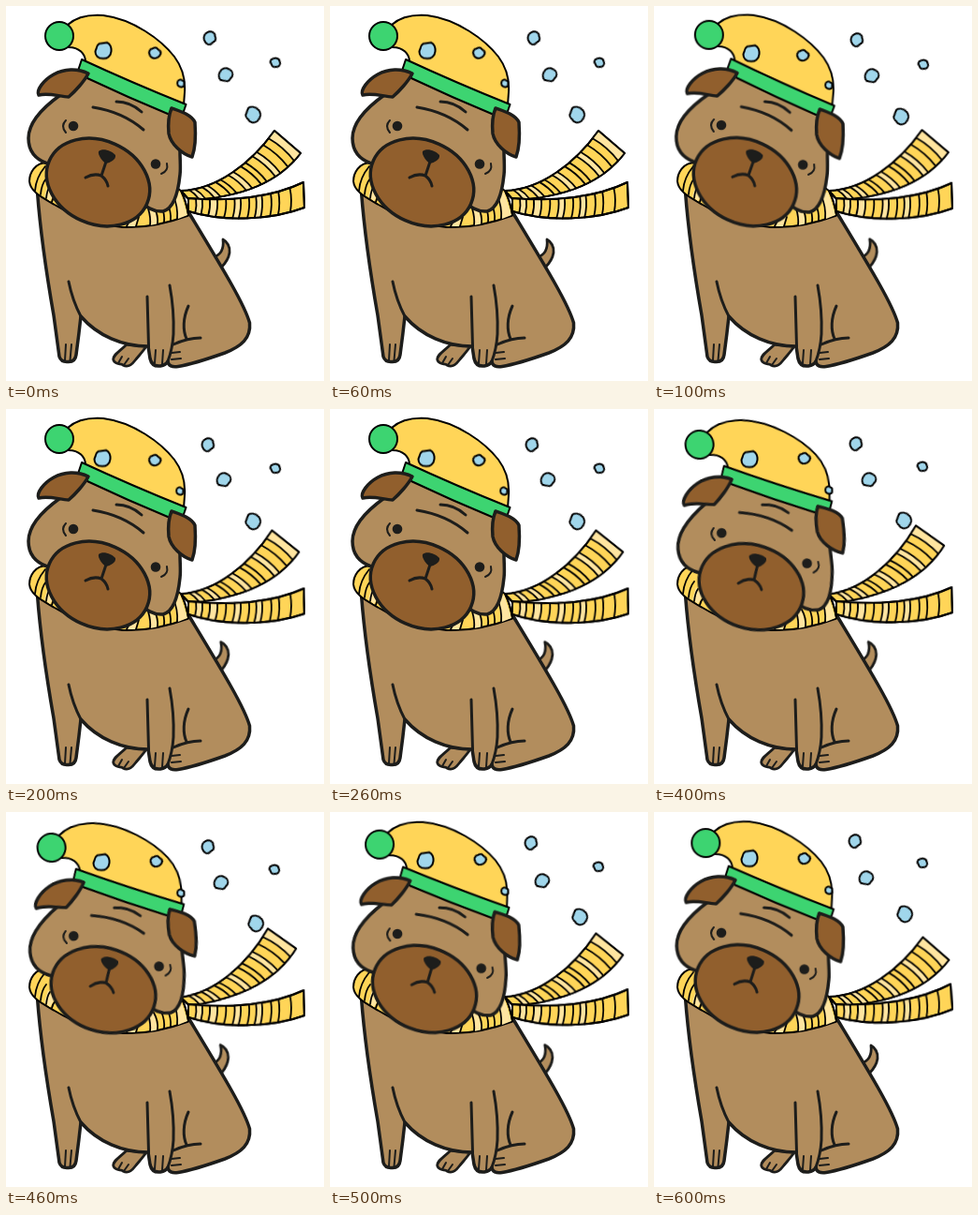
Recreate the animation shown at these times as an HTML page. Size 340x400 px, loop 0.7 s.

```html
<!DOCTYPE html>
<html lang="en">
<head>
<meta charset="utf-8">
<title>Dog in a windy scarf</title>
<style>
html, body { margin: 0; width: 100%; height: 100%; overflow: hidden; background: #fff; }
svg { display: block; width: 340px; height: 400px; }
path, circle, ellipse { stroke-linecap: round; stroke-linejoin: round; }
.fur { fill: #b28d5d; stroke: #1d1d1b; stroke-width: 3.5; }
.dark { fill: #915f2d; stroke: #1d1d1b; stroke-width: 3.5; }
.line { fill: none; stroke: #1d1d1b; stroke-width: 3; }
.thin { fill: none; stroke: #1d1d1b; stroke-width: 2; }
.ink { fill: #1d1d1b; }
.yellow { fill: #ffd558; stroke: #000; stroke-width: 2; }
.pale { fill: #ffe5a0; }
.green { fill: #3dd471; stroke: #000; stroke-width: 2; }
.edge { fill: none; stroke: #000; stroke-width: 1.8; }
.flake { fill: #a0d6eb; stroke: #000; stroke-width: 2; }
.flake path { vector-effect: non-scaling-stroke; }

/* Poses are held for a seventh of the loop each. */
.move { animation: 700ms step-end infinite; }
#head { transform-origin: 119px 127px; animation-name: tilt; }
#upper { transform-origin: 193px 203px; animation-name: flap; }
#lower { transform-origin: 195px 210px; animation-name: wave; }
#tail { transform-origin: 226px 275px; animation-name: wag; }
@keyframes tilt {
  0%, 28.571% { transform: rotate(0deg); }
  14.285% { transform: rotate(1.1deg); }
  42.857%, 71.428% { transform: rotate(-2.4deg); }
  57.142% { transform: rotate(-5.2deg); }
  85.714%, 100% { transform: rotate(-1deg); }
}
@keyframes flap {
  0% { transform: rotate(0deg); }
  14.285% { transform: rotate(-.4deg); }
  28.571%, 71.428% { transform: rotate(-2.1deg); }
  42.857% { transform: rotate(-3.5deg); }
  57.142% { transform: rotate(-5.4deg); }
  85.714%, 100% { transform: rotate(.4deg); }
}
@keyframes wave {
  0% { transform: rotate(0deg); }
  14.285% { transform: rotate(.4deg); }
  28.571% { transform: rotate(1.6deg); }
  42.857% { transform: rotate(2.7deg); }
  57.142% { transform: rotate(1deg); }
  71.428% { transform: rotate(.6deg); }
  85.714%, 100% { transform: rotate(-2.1deg); }
}
@keyframes wag {
  0% { transform: rotate(0deg); }
  14.285% { transform: rotate(-3deg); }
  28.571%, 71.428% { transform: rotate(-5deg); }
  42.857%, 57.142% { transform: rotate(-6deg); }
  85.714%, 100% { transform: rotate(0deg); }
}
@keyframes drift1 {
  0% { transform: translate(104px, 47.5px); }
  14.285% { transform: translate(104px, 50.5px); }
  28.571% { transform: translate(103px, 52.5px); }
  42.857% { transform: translate(104px, 54.5px); }
  57.142% { transform: translate(102px, 53.5px); }
  71.428% { transform: translate(102px, 51.5px); }
  85.714%, 100% { transform: translate(102px, 49.5px); }
}
@keyframes drift2 {
  0% { transform: translate(159px, 50px); }
  14.285% { transform: translate(159px, 52.5px); }
  28.571% { transform: translate(159px, 54.5px); }
  42.857% { transform: translate(159.5px, 55.5px); }
  57.142% { transform: translate(160.5px, 52.5px); }
  71.428% { transform: translate(160.5px, 50.5px); }
  85.714%, 100% { transform: translate(160.5px, 49.5px); }
}
@keyframes drift3 {
  0% { transform: translate(187px, 82.5px); }
  14.285% { transform: translate(187px, 84.5px); }
  28.571% { transform: translate(186px, 87.5px); }
  42.857% { transform: translate(187px, 89.5px); }
  57.142% { transform: translate(187px, 86.5px); }
  71.428% { transform: translate(187px, 84.5px); }
  85.714%, 100% { transform: translate(187px, 83.5px); }
}
@keyframes drift4 {
  0% { transform: translate(218px, 34px); }
  14.285% { transform: translate(217px, 36px); }
  28.571% { transform: translate(216px, 38px); }
  42.857% { transform: translate(216px, 39.5px); }
  57.142% { transform: translate(216px, 37px); }
  71.428% { transform: translate(215px, 33px); }
  85.714%, 100% { transform: translate(215px, 31px); }
}
@keyframes drift5 {
  0% { transform: translate(235px, 73.5px); }
  14.285% { transform: translate(233px, 74.5px); }
  28.571% { transform: translate(233px, 75.5px); }
  42.857% { transform: translate(232px, 78px); }
  57.142% { transform: translate(230px, 75.5px); }
  71.428% { transform: translate(227px, 73.5px); }
  85.714%, 100% { transform: translate(227px, 70.5px); }
}
@keyframes drift6 {
  0% { transform: translate(288px, 60.5px); }
  14.285% { transform: translate(288px, 62.5px); }
  28.571% { transform: translate(288px, 63.5px); }
  42.857% { transform: translate(287px, 65.5px); }
  57.142% { transform: translate(287px, 61.5px); }
  71.428% { transform: translate(287px, 58.5px); }
  85.714%, 100% { transform: translate(287px, 54.5px); }
}
@keyframes drift7 {
  0% { transform: translate(264px, 116px); }
  14.285% { transform: translate(264px, 118px); }
  28.571% { transform: translate(264px, 120px); }
  42.857% { transform: translate(264px, 121.5px); }
  57.142% { transform: translate(267px, 119px); }
  71.428% { transform: translate(267px, 112px); }
  85.714%, 100% { transform: translate(268px, 109px); }
}
</style>
</head>
<body>
<svg viewBox="0 0 340 400">
  <clipPath id="crop"><rect width="320" height="400"/></clipPath>

  <g id="body">
    <path id="tail" class="fur move" style="stroke-width:2.8" d="M232,249C236,251 240,257 239,263C238,270 234,275 230,279L222,268C231,265 233,258 232,249Z"/>
    <path class="fur" style="stroke-width:2.8" d="M129,361C121,369 113,373 115,378C117,383 123,381 125,383C130,386 135,382 138,378C142,373 146,369 150,363Z"/>
    <path class="thin" d="M124,374L120,381M131,376L126,383"/>
    <path class="fur" d="M33.500,198C37,245 44,290 51,330L57,374Q59,380 66,379.500Q74,380 75,372Q78,350 80,331C98,352 125,363 152,363L154,376Q156,385 165,384Q171,383 173,379Q174,386 184,384.500C200,382 217,376 234,370C252,363 262,354 260.500,338C255,318 231,279 196.500,222Z"/>
    <path class="line" d="M67,294Q71,314 80,331M151,310L152.500,363M175,298Q180,325 179,350Q178,366 173,379M195,320C189,333 189,346 193,355M179,361C190,356 200,354 208,354"/>
    <path class="thin" d="M64,361L63,378M70,361L68.500,378M160,367L159,381M168,367L167,382M177,370L186,369M177,377L187,376"/>
  </g>

  <g clip-path="url(#crop)">
    <g id="upper" class="move"></g>
    <g id="lower" class="move"></g>
  </g>

  <g id="neck">
    <path class="yellow" d="M44,167C31,167 25,178 25,187C26,198 38,204 52,212C75,226 100,234 125,236C150,237 172,232 195,223.500Q193,209 187,197L180,192Z"/>
    <path class="pale" d="M41,203L45,190L52,200L47,208ZM133,225L141,225L138,235L128,235ZM152,215L158,214L163,232L154,234ZM179,202L186,198L194,223L184,227Z"/>
    <path class="edge" d="M31,197Q32,183 42,171M37,201Q38,190 43,184M43,205Q44,196 47,192M49,209Q50,204 53,202M133,227L129,235M142,225L139,235M152,216Q155,226 154,234M158,214Q163,223 162,232M166,213Q170,222 169,231M172,209Q177,220 176,229M179,203Q184,214 183,227M187,197Q193,209 195,223"/>
  </g>

  <g id="head" class="move">
    <path class="fur" d="M58,95C44,105 24,122 24,141C24,156 33,164 44,168L140,205C150,215 158,220 168,219C179,216 184,200 186,180C187,172 186,165 186,155L188,112L80,70Z"/>
    <ellipse class="dark" cx="98.500" cy="188" rx="57" ry="44.500" transform="rotate(24 98.500 188)"/>
    <path class="line" d="M93,108Q125,113 147,132"/>
    <path class="line" d="M118,102Q133,102 145,113"/>
    <circle class="ink" cx="72" cy="128" r="5.300"/>
    <circle class="ink" cx="160" cy="168.500" r="5.300"/>
    <path class="thin" d="M64,122Q58,128 64,135M172,168Q174,176 166,179"/>
    <path class="ink" d="M99,155C103,151 113,154 117,159C118,164 111,167 107,168C103,166 98,159 99,155Z"/>
    <path class="line" d="M107,166L102,181M85,183Q94,178 102,181Q108,186 109,192"/>
    <path class="yellow" d="M66,20C76,11 90,9 104,10C136,14 166,36 180,54C189,66 192,78 191,92L190,106L85,62C86,50 77,44 67,44Z"/>
    <path class="green" d="M81,57Q135,82 192.500,105L187,121Q131,98 76,72Z"/>
    <circle class="green" cx="57" cy="32" r="15"/>
    <path class="dark" d="M35,95C32,90 40,79 51,73C62,67 76,66 88,72C84,80 74,91 67,97C58,97 46,92 35,95Z"/>
    <path class="dark" d="M177,109C188,113 198,116 202,124C203,138 203,150 199,161C188,158 176,147 174,136C173,125 174,116 177,109Z"/>
  </g>

  <g id="snow"></g>
</svg>
<script>
const NS = 'http://www.w3.org/2000/svg';

function add(parent, tag, attrs) {
  const el = document.createElementNS(NS, tag);
  for (const key in attrs) el.setAttribute(key, attrs[key]);
  return parent.appendChild(el);
}

// Point on a cubic curve given as eight coordinates.
function at(c, t) {
  const u = 1 - t;
  const mix = i => u * u * u * c[i] + 3 * u * u * t * c[i + 2] + 3 * u * t * t * c[i + 4] + t * t * t * c[i + 6];
  return [mix(0), mix(1)];
}

const curve = c => `C${c.slice(2)}`;
const back = c => [6, 7, 4, 5, 2, 3, 0, 1].map(i => c[i]);

// A ribbon between two curves, with cross lines at the given cuts
// and pale cloth from each cut in `pale` to the next one.
function ribbon(id, top, low, cuts, pale) {
  const group = document.getElementById(id);
  const across = t => {
    const [ax, ay] = at(top, t), [bx, by] = at(low, t);
    const dx = bx - ax, dy = by - ay;
    return { a: [ax, ay], b: [bx, by], m: [(ax + bx) / 2 + dy * .1, (ay + by) / 2 - dx * .1] };
  };
  const body = `M${top.slice(0, 2)}${curve(top)}L${low.slice(6)}${curve(back(low))}Z`;
  add(group, 'path', { class: 'yellow', d: body });
  for (const i of pale) {
    const p = across(cuts[i]), q = across(cuts[i + 1] || 1);
    add(group, 'path', { class: 'pale', d: `M${p.a}Q${p.m} ${p.b}L${q.b}Q${cuts[i + 1] ? q.m : q.b} ${q.a}Z` });
  }
  for (const t of cuts) {
    const p = across(t);
    add(group, 'path', { class: 'edge', d: `M${p.a}Q${p.m} ${p.b}` });
  }
  add(group, 'path', { class: 'yellow', style: 'fill:none', d: body });
}

ribbon('upper',
  [187, 197, 225, 196, 262, 168, 287, 133],
  [196, 207, 240, 205, 288, 193, 315, 157],
  [.08, .13, .2, .25, .33, .38, .46, .51, .59, .64, .72, .77, .85, .92],
  [0, 2, 6, 10, 13]);
ribbon('lower',
  [195, 205, 240, 209, 285, 204, 318, 188],
  [195, 219, 235, 231, 285, 228, 319, 215],
  [.06, .11, .17, .23, .3, .37, .42, .49, .55, .6, .68, .75, .86],
  [0, 2, 5, 8]);

const flake = 'M-.5,-.8L.45,-.95C.85,-.8 1,-.3 .95,.1C.9,.7 .4,1 -.05,.95C-.6,.95 -.95,.6 -.95,.1L-.8,-.3Q-.8,-.6 -.5,-.8Z';
const snow = document.getElementById('snow');
[9, 6, 4, 6.8, 7.4, 5.2, 8.3].forEach((r, i) => {
  const g = add(snow, 'g', { class: 'flake move', style: `animation-name:drift${i + 1}` });
  add(g, 'path', { d: flake, transform: `rotate(${i * 50}) scale(${r})` });
});
</script>
</body>
</html>
```
